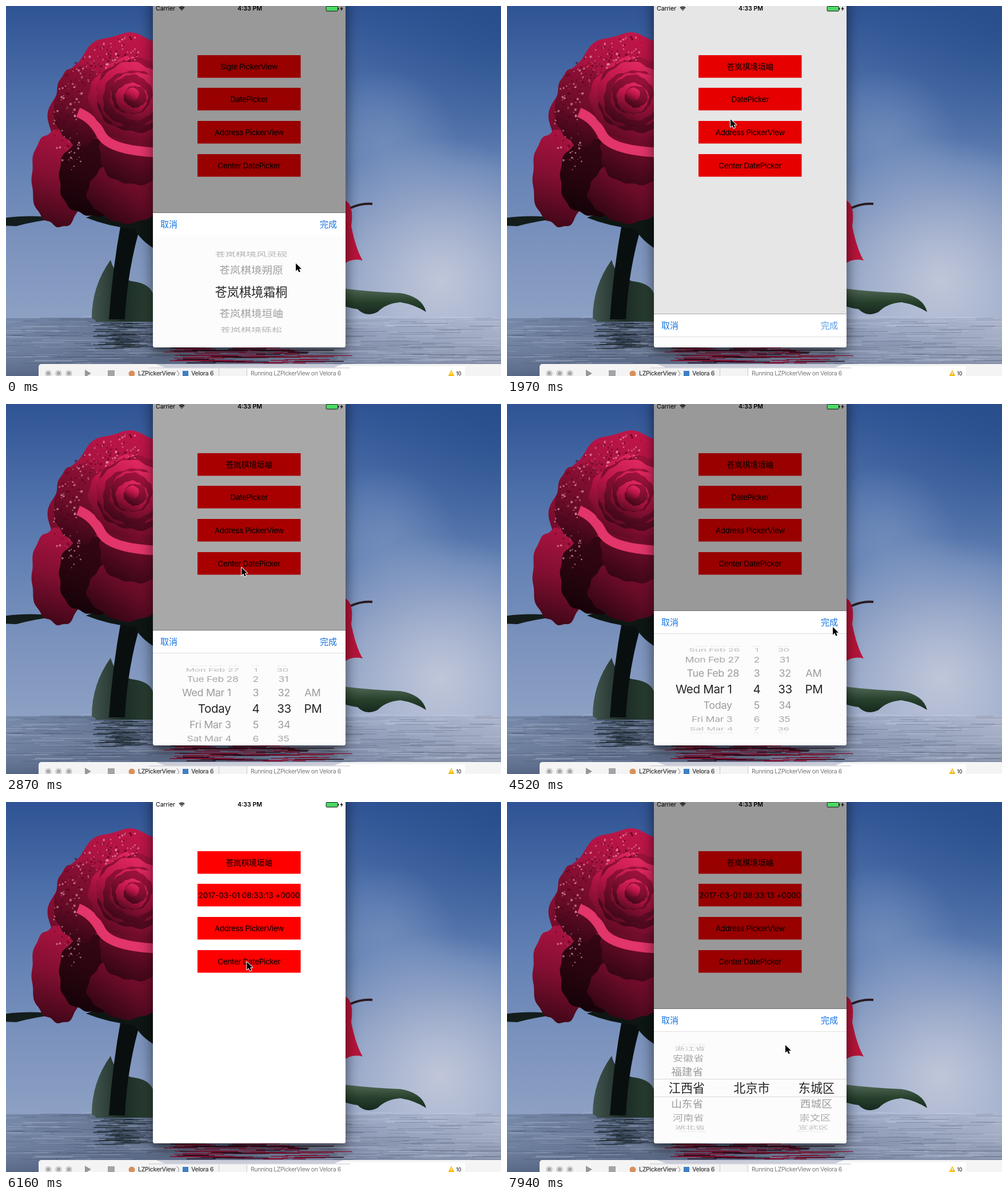
An HTML page with a canvas that plays this animation: 866 by 647 pixels, repeating every 8 s.

```html
<!DOCTYPE html>
<html lang="zh">
<head>
<meta charset="utf-8">
<title>Picker demo</title>
<style>
html, body { margin: 0; width: 866px; height: 647px; overflow: hidden; background: #5a7cb2; }
canvas { display: block; }
</style>
</head>
<body>
<canvas id="stage" width="866" height="647"></canvas>
<script>
const W = 866, H = 647, LOOP = 8000, STEP = 150;
const HAN = '"Noto Sans CJK SC", "Noto Sans CJK", sans-serif';
const LATIN = 'Inter, ' + HAN;
const PHONE = { x: 257, w: 337, bottom: 597 };
const SHEET = 235;
const ctx = document.getElementById('stage').getContext('2d');

let seed = 7;
const rnd = () => (seed = seed * 16807 % 2147483647) / 2147483647;
const repeat = (n, fn) => { for (let i = 0; i < n; i++) fn(i); };

// ---------- drawing helpers ----------
function rect(g, color, x, y, w, h) {
  g.fillStyle = color;
  g.fillRect(x, y, w, h);
}

function disc(g, color, x, y, r) {
  g.fillStyle = color;
  g.beginPath();
  g.arc(x, y, r, 0, 7);
  g.fill();
}

function fill(g, color, path) {
  g.fillStyle = color;
  g.fill(new Path2D(path));
}

function line(g, color, width, path) {
  g.strokeStyle = color;
  g.lineWidth = width;
  g.stroke(new Path2D(path));
}

function box(g, color, x, y, w, h, r) {
  g.fillStyle = color;
  g.beginPath();
  g.roundRect(x, y, w, h, r);
  g.fill();
}

function ramp(g, x0, y0, x1, y1, colors) {
  const grad = g.createLinearGradient(x0, y0, x1, y1);
  colors.forEach((c, i) => grad.addColorStop(i / (colors.length - 1), c));
  return grad;
}

function glow(g, color, x, y, r) {
  const grad = g.createRadialGradient(x, y, 0, x, y, r);
  grad.addColorStop(0, color);
  grad.addColorStop(1, color.slice(0, 7) + '00');
  rect(g, grad, x - r, y - r, 2 * r, 2 * r);
}

function text(g, str, x, y, size, o = {}) {
  g.font = `${o.weight || 400} ${size}px ${o.font || LATIN}`;
  g.letterSpacing = (o.space || 0) + 'px';
  g.textAlign = o.align || 'center';
  g.textBaseline = 'middle';
  g.fillStyle = o.color || '#000';
  g.fillText(str, x, y);
}

// ---------- static backdrop ----------
function drawSky(g) {
  rect(g, ramp(g, 0, 0, 0, 560, ['#2f5394', '#4a6da8', '#6482b5', '#7c93bd', '#8fa2c5']), 0, 0, W, H);
  glow(g, '#234a86a0', 866, 30, 260);
  glow(g, '#7f97c090', 660, 240, 130);
  glow(g, '#c9cddddd', 760, 480, 250);
}

function drawWater(g) {
  rect(g, ramp(g, 0, 0, W, 0, ['#7487a8', '#5f6f8c', '#6c7b98', '#9ba7c2', '#adb6cc']), 0, 546, W, 101);
  rect(g, ramp(g, 0, 540, 0, 647, ['#a0aac300', '#3c4a6680']), 0, 540, W, 107);
  repeat(380, () => rect(g, rnd() < 0.5 ? '#2c3a5240' : '#ccd4e345',
    rnd() * W - 40, 542 + rnd() * 84, 20 + rnd() * 90, 0.6 + rnd()));
  repeat(80, () => rect(g, rnd() < 0.6 ? '#8d1236' : '#2a0c1b',
    275 + rnd() * 240, 597 + rnd() * 27, 20 + rnd() * 80, 1.4));
  repeat(70, () => rect(g, '#0e171c90', 150 + rnd() * 60, 544 + rnd() * 55, 15 + rnd() * 45, 1.2));
}

function drawLeaves(g) {
  fill(g, ramp(g, 150, 0, 258, 0, ['#43564f', '#1b2b25', '#2d4334']),
    'M150 546Q150 490 183 444Q192 478 225 482Q252 486 258 505V552H160Z');
  fill(g, '#090f0f', 'M202 375H238Q212 460 208 548H180Q186 460 202 375Z');
  fill(g, '#0d1613', 'M140 370Q200 345 262 360V426Q235 410 225 390Q180 386 140 370Z');
  fill(g, '#131d1b', 'M-5 371Q40 364 95 371Q50 376 18 385L-5 384Z');
  fill(g, ramp(g, 0, 495, 0, 540, ['#4f6653', '#26402c', '#16261d']),
    'M590 494Q640 500 690 502Q728 508 735 535Q715 522 690 518Q665 520 650 535Q630 545 615 530Q600 528 590 524Z');
}

// Ruffled oval, shaded from its light top right to its dark foot
function petal(g, x, y, rx, ry, light) {
  const tone = l => `hsl(342 80% ${l}%)`;
  const p = rnd() * 6, q = rnd() * 6;
  g.fillStyle = ramp(g, x + rx / 2, y - ry, x - rx / 2, y + ry, [tone(light), tone(light * 0.75), tone(light * 0.35)]);
  g.beginPath();
  for (let a = 0; a < 6.28; a += 0.05) {
    const r = 1 + 0.03 * Math.sin(5 * a + p) + 0.02 * Math.sin(13 * a + q);
    g.lineTo(x + rx * r * Math.cos(a), y + ry * r * Math.sin(a));
  }
  g.fill();
}

function drawRose(g) {
  g.save();
  g.beginPath();
  g.rect(0, 0, PHONE.x + 4, H);
  g.clip();
  petal(g, 225, 202, 146, 152, 44);
  petal(g, 92, 300, 48, 86, 38);
  petal(g, 150, 300, 58, 68, 12);
  petal(g, 215, 325, 72, 54, 30);
  petal(g, 130, 175, 46, 70, 32);
  petal(g, 225, 255, 62, 58, 30);
  line(g, '#e2356a', 17, 'M126 186Q152 196 166 224T262 256');
  // The heart: nested petals, light and dark in turn
  repeat(9, i => {
    const s = 1 - i / 9.5;
    petal(g, 222 + 4 * Math.sin(i * 2), 158 + 4 * Math.cos(i * 2), 76 * s, 72 * s, i % 2 ? 36 : 54);
  });
  // Dew along the outer rim
  repeat(260, () => {
    const a = 2.5 + rnd() * 2.3, d = 0.7 + rnd() * 0.28;
    disc(g, rnd() < 0.45 ? '#f4a9bf90' : '#4a041a90', 225 + 146 * d * Math.cos(a), 202 + 152 * d * Math.sin(a), 0.6 + rnd() * 1.6);
  });
  g.restore();
  fill(g, '#b9143a', 'M590 338Q610 345 604 385Q612 425 624 445Q605 440 590 452Z');
  line(g, '#2a1b22', 4, 'M603 353Q622 344 641 346');
}

function drawToolbar(g) {
  box(g, '#f4f4f5', 57, 626, 830, 40, 5);
  rect(g, '#fff', 421, 630, 382, 20);
  fill(g, '#c9ccd8', 'M262 626H590L572 633H280Z');
  rect(g, '#d5d6dc', 250, 632, 352, 1.5);
  for (const x of [372, 421]) rect(g, '#c6c6ca', x, 634, 1, 13);
  for (const x of [74, 92, 110]) {
    disc(g, '#b4b4b6', x, 642.5, 5.5);
    disc(g, '#f4f4f5', x, 642.5, 4.5);
    disc(g, '#a6a6a8', x, 642.5, 3.4);
  }
  fill(g, '#96969b', 'M138 636L149 642.5L138 649Z');
  rect(g, '#a3a3a8', 178, 637, 12, 12);
  disc(g, '#d9905a', 220, 643, 5.5);
  rect(g, '#3f7fc4', 309, 638, 10, 10);
  const label = { align: 'left', space: -0.4, color: '#3c3c3e', weight: 500 };
  text(g, 'LZPickerView', 231, 643, 10.7, label);
  text(g, 'Velora 6', 324, 643, 10.7, label);
  line(g, '#8a8a8e', 1, 'M299 637L303 643L299 649');
  text(g, 'Running LZPickerView on Velora 6', 428, 643, 10.5, { align: 'left', space: -0.4, color: '#77777b' });
  fill(g, '#f6bd16', 'M779 636.5L785 648H773Z');
  rect(g, '#fff', 778.4, 640, 1.3, 4.5);
  text(g, '10', 787.5, 643, 8.5, { align: 'left', color: '#222', weight: 500 });
}

function makeScene() {
  const c = document.createElement('canvas');
  c.width = W;
  c.height = H;
  const g = c.getContext('2d');
  drawSky(g);
  drawWater(g);
  drawLeaves(g);
  drawRose(g);
  g.save();
  g.shadowColor = 'rgba(0,0,0,.6)';
  g.shadowBlur = 24;
  g.shadowOffsetY = 8;
  box(g, '#fff', PHONE.x, -20, PHONE.w, PHONE.bottom + 20, 4);
  g.restore();
  drawToolbar(g);
  return c;
}

// ---------- motion ----------
// Eased 0 to 1 while x runs from a to b
function ease(x, a, b) {
  const u = Math.min(1, Math.max(0, (x - a) / (b - a)));
  return (1 - Math.cos(Math.PI * u)) / 2;
}

const CLOSE_1 = 1764, OPEN_2 = 2640, CLOSE_2 = 5610, OPEN_3 = 6160;
const slide = (t, start) => ease(t, start, start + 300);
const openness = t => 1 - slide(t, CLOSE_1) + slide(t, OPEN_2) - slide(t, CLOSE_2) + slide(t, OPEN_3);

const heroPos = k => ease(k, 0, 7);
const datePos = k => -ease(k, 24, 28);
const provincePos = k => 5 * ease(k, 42, 45) + 9 * ease(k, 48, 53);

// Pointer stops: step, x, y
const POINTER = [
  [0, 507, 450], [4, 503, 436], [8, 569, 384], [11, 569, 384], [13, 391, 198], [17, 398, 172], [19, 412, 286],
  [23, 350, 480], [30, 570, 390], [37, 570, 386], [39, 424, 395], [42, 420, 222], [43, 330, 500], [45, 561, 472],
  [48, 330, 540], [51, 340, 430], [53, 487, 425]];

function pointerAt(k) {
  const i = Math.max(1, POINTER.findIndex(p => p[0] >= k));
  const [a, x, y] = POINTER[i - 1], [b, u, v] = POINTER[i];
  const f = (k - a) / (b - a);
  return [x + (u - x) * f, y + (v - y) * f];
}

// ---------- wheels ----------
const GAME = '苍岚棋境';
const HEROES = ['风灵砚', '朔原', '霜桐', '垣岫', '砾松'];
const PROVINCES = ('北京 天津 上海 重庆 河北省 山西省 内蒙古 辽宁省 吉林省 黑龙江省 江苏省 浙江省 安徽省 福建省 ' +
  '江西省 山东省 河南省 湖北省 湖南省 广东省').split(' ');
const DISTRICTS = ['东城区', '西城区', '崇文区', '宣武区', '朝阳区'];

const heroAt = i => HEROES[i + 2] && GAME + HEROES[i + 2];
function dayAt(i) {
  const d = new Date(2017, 2, 2 + i);
  return i ? d.toDateString().slice(0, 8) + d.getDate() : 'Today';
}

// Rows lie on a cylinder seen from the front
function wheel(item, pos, x, cy, o = {}) {
  const angle = o.angle || 0.377, radius = o.radius || 76;
  const base = Math.round(pos);
  for (let i = base - 4; i <= base + 4; i++) {
    const str = item(i), a = (i - pos) * angle;
    if (!str || Math.abs(a) > 1.53) continue;
    const big = Math.abs(i - pos) < 0.5, cos = Math.cos(a), s = 1 - 0.087 * (1 - cos);
    const pad = o.align === 'right' && !/\d\d$/.test(str) ? 12.5 : 0;
    const size = o.latin ? (big ? 20.6 : 18.1) : (big ? 21.1 : 18.8);
    ctx.save();
    ctx.translate(428 + (x - pad - 428) * s, cy + radius * Math.sin(a));
    ctx.scale(s, big ? 1 : Math.max(cos, 0.15));
    ctx.globalAlpha = big ? 0.85 : 0.4 * Math.sqrt(cos);
    text(ctx, str, 0, 0, size, { align: o.align, font: o.latin ? LATIN : HAN, space: o.latin ? -0.35 : 0 });
    ctx.restore();
  }
}

const PICKERS = [
  (k, cy) => wheel(heroAt, heroPos(k), 429, cy, { angle: 0.495, radius: 79 }),
  (k, cy) => {
    const o = { latin: true };
    wheel(dayAt, datePos(k), 406, cy, { latin: true, align: 'right' });
    wheel(i => String((i + 15) % 12 + 1), 0, 437, cy, o);
    wheel(i => String(33 + i), 0, 486.5, cy, o);
    wheel(i => ({ '-1': 'AM', 0: 'PM' })[i], 0, 537, cy, o);
  },
  (k, cy) => {
    for (const dy of [-16, 15]) rect(ctx, '#d6d6d6', PHONE.x, Math.round(cy + dy), PHONE.w, 1);
    wheel(i => PROVINCES[i], provincePos(k), 314.5, cy);
    wheel(i => i === 0 && '北京市', 0, 428, cy);
    wheel(i => DISTRICTS[i], 0, 541.5, cy);
  }];

// ---------- phone ----------
function drawButtons(t) {
  const labels = [
    t < CLOSE_1 ? 'Sigle PickerView' : heroAt(1),
    t < CLOSE_2 ? 'DatePicker' : '2017-03-01 08:33:13 +0000',
    'Address PickerView', 'Center DatePicker'];
  labels.forEach((str, i) => {
    const y = Math.round(85.6 + i * 57.7);
    rect(ctx, '#ff0000', 335, y, 180.5, 39.5);
    const space = /\d/.test(str) ? -0.1 : /[a-z]/.test(str) ? -0.4 : 0;
    text(ctx, str, 425.3, y + 20.5, 13.6, { space });
  });
}

function drawStatusBar() {
  text(ctx, 'Carrier', 262, 5, 10.6, { align: 'left', space: -0.1 });
  text(ctx, '4:33 PM', 426.5, 5, 10.6, { weight: 600 });
  ctx.strokeStyle = '#000';
  ctx.lineWidth = 1.5;
  for (const r of [1.5, 4.2, 6.9]) {
    ctx.beginPath();
    ctx.arc(307.5, 8.5, r, -2.3, -0.84);
    ctx.stroke();
  }
  box(ctx, '#222', 559.6, 0, 21.3, 9.4, 2);
  rect(ctx, '#4cd964', 560.6, 1, 19.3, 7.4);
  rect(ctx, '#222', 581, 3, 1.3, 3.5);
  fill(ctx, '#000', 'M588 .5L584.5 5.3H586.8L586 9L589.6 4H587.3Z');
}

function drawSheet(t, k, top) {
  if (top >= PHONE.bottom) return;
  rect(ctx, 'rgba(0,0,0,.25)', PHONE.x, Math.round(top) - 1, PHONE.w, 1);
  rect(ctx, '#fcfcfc', PHONE.x, top, PHONE.w, SHEET);
  rect(ctx, '#fff', PHONE.x, top, PHONE.w, 39);
  if (t >= CLOSE_1) rect(ctx, '#dedede', PHONE.x, Math.round(top + 39), PHONE.w, 1);
  const tapped = t >= CLOSE_1 && t < OPEN_2 || t >= CLOSE_2 && t < OPEN_3;
  text(ctx, '取消', 285, top + 19.2, 15, { font: HAN, color: '#1273e2', weight: 500 });
  text(ctx, '完成', 564, top + 19.2, 15, { font: HAN, color: tapped ? '#559be9' : '#1273e2', weight: 500 });
  PICKERS[t < OPEN_2 ? 0 : t < OPEN_3 ? 1 : 2](k, top + 137.7);
}

function drawPointer([x, y]) {
  const arrow = 'M0 0V13.5L3.2 10.6L5.4 15.6L7.8 14.6L5.7 9.7H10Z';
  ctx.save();
  ctx.translate(x, y);
  ctx.lineJoin = 'round';
  line(ctx, '#fff', 2, arrow);
  fill(ctx, '#000', arrow);
  ctx.restore();
}

const scene = makeScene();

function draw(now) {
  const k = Math.floor((now % LOOP + 10) / STEP), t = k * STEP + 15;
  const open = openness(t), top = PHONE.bottom - SHEET * open;
  ctx.drawImage(scene, 0, 0);
  ctx.save();
  ctx.beginPath();
  ctx.roundRect(PHONE.x, -20, PHONE.w, PHONE.bottom + 20, 4);
  ctx.clip();
  rect(ctx, '#fff', PHONE.x, 0, PHONE.w, PHONE.bottom);
  drawButtons(t);
  rect(ctx, `rgba(0,0,0,${0.4 * open})`, PHONE.x, 0, PHONE.w, PHONE.bottom);
  drawStatusBar();
  drawSheet(t, k, top);
  ctx.restore();
  drawPointer(pointerAt(k));
}

const start = performance.now();
function tick() {
  draw(performance.now() - start);
  requestAnimationFrame(tick);
}
tick();
</script>
</body>
</html>
```
